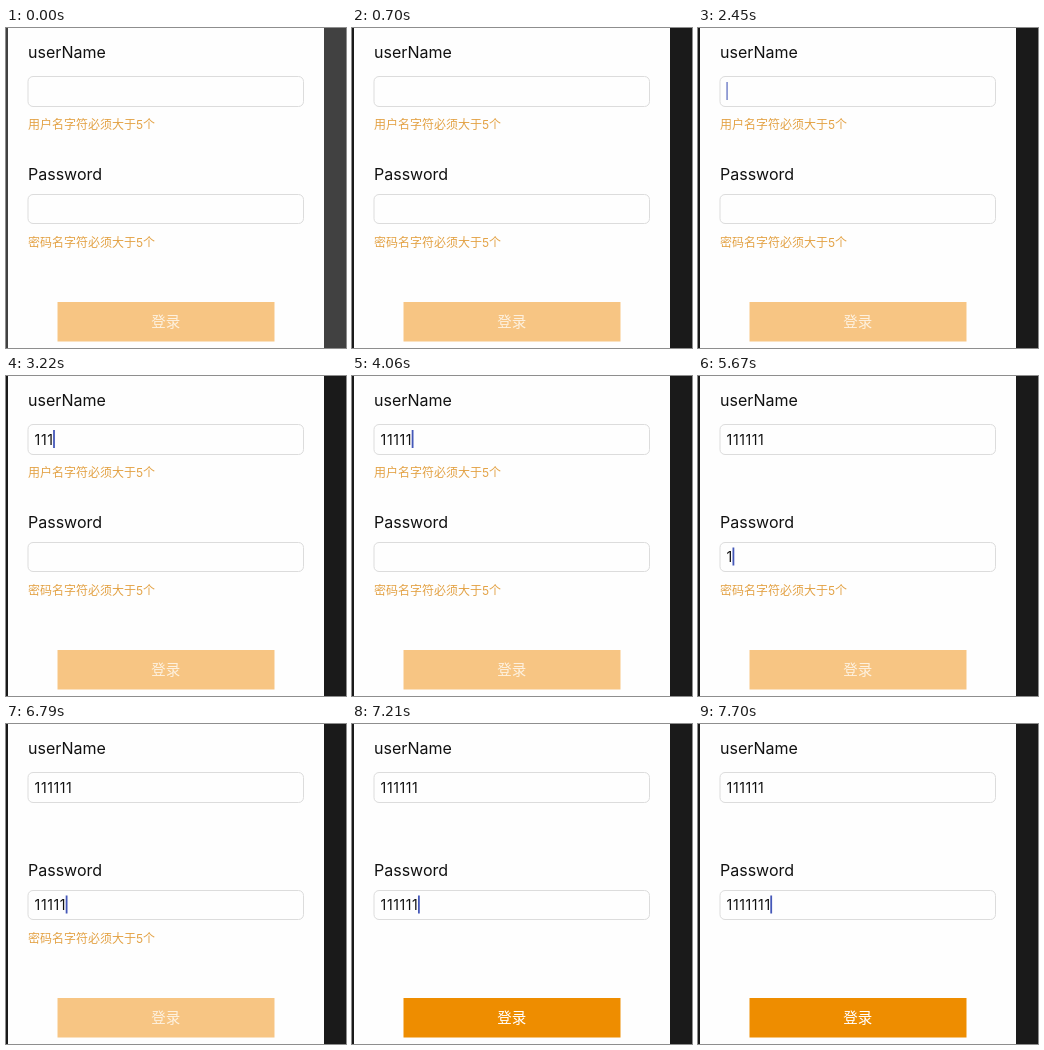
An HTML page that plays this animation: 340x320 px, repeating every 8000 ms.

```html
<!DOCTYPE html>
<html lang="zh-CN">
<head>
<meta charset="utf-8">
<title>Login form</title>
<style>
  html, body { margin: 0; width: 100%; height: 100%; overflow: hidden; }
  svg { display: block; }
  text { font-family: Inter, "Noto Sans CJK SC", "Noto Sans CJK", sans-serif; }
  .label { font-size: 16px; fill: #111; }
  .value { font-size: 14px; fill: #111; }
  .error { font-size: 12px; fill: #e3a245; }
  .box { fill: #fefefe; stroke: #dcdcdc; }
  .caret { fill: #4558b8; }
</style>
</head>
<body>
<svg width="340" height="320" viewBox="0 0 340 320">
  <rect id="backdrop" width="340" height="320"/>
  <rect x="2" width="316" height="320" fill="#fefefe"/>

  <text class="label" x="22" y="30">userName</text>
  <rect class="box" x="22" y="48.5" width="275.5" height="30" rx="5"/>
  <text class="value" id="userValue" y="68.5"></text>
  <rect class="caret" id="userCaret" y="54" width="1.8" height="18"/>
  <text class="error" id="userError" x="22" y="101">用户名字符必须大于5个</text>

  <text class="label" x="22" y="152">Password</text>
  <rect class="box" x="22" y="166.5" width="275.5" height="29" rx="5"/>
  <text class="value" id="passValue" y="186"></text>
  <rect class="caret" id="passCaret" y="171.5" width="1.8" height="18"/>
  <text class="error" id="passError" x="22" y="219">密码名字符必须大于5个</text>

  <rect id="button" x="51.5" y="274" width="217" height="39.5"/>
  <text id="buttonText" x="159.7" y="299.3" font-size="14.5" text-anchor="middle">登录</text>
</svg>
<script>
const LOOP = 8000, STEP = 6.3, MIN = 5;
const userKeys = [2800, 3080, 3220, 3500, 4060, 4620];
const passKeys = [5670, 5950, 6160, 6440, 6790, 7210, 7700];

// [time, opacity] pairs; each value holds until the next one
const userBlink = [[0, 0], [1610, 1], [2450, .6], [2520, .3], [2590, 0], [2800, 1],
                   [5180, .6], [5250, .3], [5320, 0]];
const passBlink = [[0, 0], [5320, 1]];

const $ = id => document.getElementById(id);
const set = (id, name, value) => $(id).setAttribute(name, value);
const held = (steps, t) => steps.filter(([at]) => at <= t).pop()[1];

function drawField(name, keys, blink, t) {
  const count = keys.filter(at => at <= t).length;
  const value = $(name + "Value");
  value.textContent = "1".repeat(count);
  value.setAttribute("x", Array.from({ length: count }, (_, i) => 28.6 + i * STEP).join(" "));
  set(name + "Caret", "x", 28.2 + count * STEP);
  set(name + "Caret", "opacity", held(blink, t));
  set(name + "Error", "visibility", count > MIN ? "hidden" : "visible");
  return count > MIN;
}

function render(t) {
  const userValid = drawField("user", userKeys, userBlink, t);
  const passValid = drawField("pass", passKeys, passBlink, t);
  const enabled = userValid && passValid;
  set("backdrop", "fill", t < 700 ? "#414141" : "#1a1a1a");
  set("button", "fill", enabled ? "#ee8d00" : "#f7c583");
  set("buttonText", "fill", enabled ? "#fff" : "#fdf1df");
}

function tick() {
  render(performance.now() % LOOP);
  requestAnimationFrame(tick);
}
tick();
</script>
</body>
</html>
```
